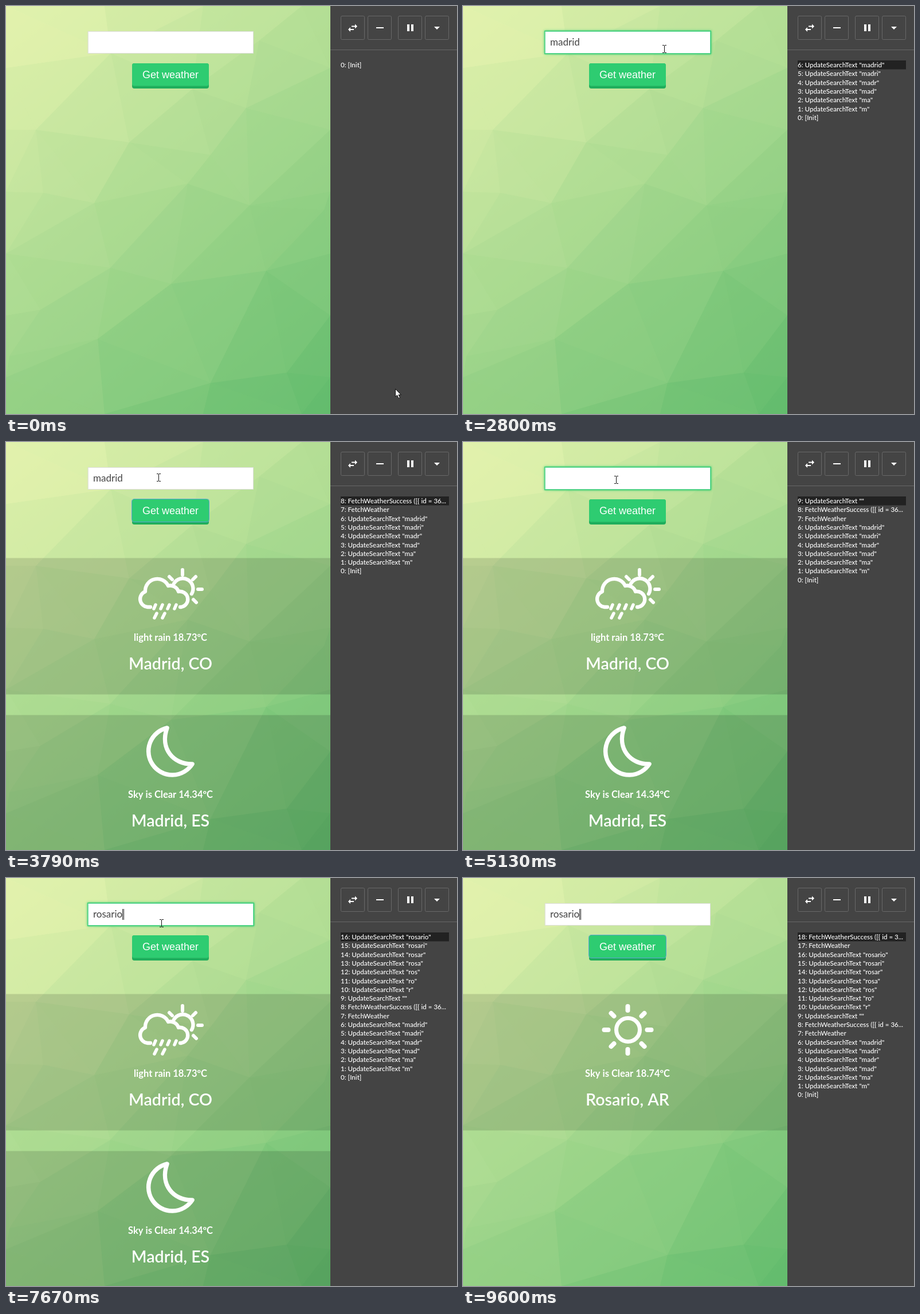
These frames come from a looping animation (787 px wide and 712 px high, 9980 ms). An HTML page with a canvas:

```html
<!DOCTYPE html>
<html lang="en">
<head>
<meta charset="utf-8">
<title>Weather search</title>
<style>
html, body { margin: 0; width: 100%; height: 100%; overflow: hidden; background: #444; }
canvas { display: block; }
</style>
</head>
<body>
<canvas id="stage" width="787" height="712"></canvas>
<script>
const LOOP = 9980, STEP = 77.4;
const WIDTH = 566, HEIGHT = 712, MID = 287;
const GREEN = '#2ecc71';
const FOCUS = 1090, SUBMIT = 3330, RESULT = 3790;
const REFOCUS = 4500, SELECT = 4660, CLEAR = 5130, SUBMIT_2 = 8140, RESULT_2 = 8530;

const ctx = document.getElementById('stage').getContext('2d');
const clamp = k => Math.min(1, Math.max(0, k));
const mix = (a, b, k) => a + (b - a) * k;

// Low-poly backdrop: Delaunay mesh, each face tinted by its place on the diagonal
function meshPoints() {
  const points = `183,82 442,60 325,145 419,178 52,216 215,238 357,260 317,310 425,348 555,356
    154,344 65,326 182,457 288,485 454,462 60,530 160,581 357,658 490,640 6,611`
    .split(/\s+/).map(p => p.split(',').map(Number));
  for (let y = 0; y < HEIGHT; y += 108) points.push([0, y], [WIDTH, y]);
  for (let x = 172; x < WIDTH; x += 172) points.push([x, 0], [x, HEIGHT]);
  points.push([0, HEIGHT], [WIDTH, HEIGHT]);
  return points;
}

function circumcentre([ax, ay], [bx, by], [cx, cy]) {
  const d = 2 * (ax * (by - cy) + bx * (cy - ay) + cx * (ay - by));
  if (!d) return null;
  const a = ax * ax + ay * ay, b = bx * bx + by * by, c = cx * cx + cy * cy;
  return [
    (a * (by - cy) + b * (cy - ay) + c * (ay - by)) / d,
    (a * (cx - bx) + b * (ax - cx) + c * (bx - ax)) / d
  ];
}

function triangulate(points) {
  const faces = [];
  const distance = (p, q) => Math.hypot(p[0] - q[0], p[1] - q[1]);
  points.forEach((a, i) => points.slice(i + 1).forEach((b, j) => {
    for (const c of points.slice(i + j + 2)) {
      const o = circumcentre(a, b, c);
      if (o && points.every(p => distance(o, p) > distance(o, a) - 1e-6)) faces.push([a, b, c]);
    }
  }));
  return faces;
}

function tint(k) {
  const channels = [mix(236, 103, k), mix(246, 190, k), mix(178, 111, k)];
  return `rgb(${channels.map(Math.round)})`;
}

function paintBackdrop() {
  const layer = document.createElement('canvas');
  layer.width = WIDTH;
  layer.height = HEIGHT;
  const g = layer.getContext('2d');
  const fade = g.createLinearGradient(0, 0, WIDTH, HEIGHT);
  fade.addColorStop(0, tint(0));
  fade.addColorStop(1, tint(1.05));
  g.fillStyle = fade;
  g.fillRect(0, 0, WIDTH, HEIGHT);
  g.globalAlpha = .75;
  for (const face of triangulate(meshPoints())) {
    const along = face.reduce((sum, [x, y]) => sum + x * WIDTH + y * HEIGHT, 0) / 3;
    g.fillStyle = tint(1.05 * along / (WIDTH ** 2 + HEIGHT ** 2));
    g.beginPath();
    face.forEach(p => g.lineTo(...p));
    g.fill();
  }
  return layer;
}
const backdrop = paintBackdrop();

const words = [
  { word: 'madrid', start: 1620, gap: 112 },
  { word: 'rosario', start: 5360, gap: 78 }
];
const typed = ({ word, start, gap }, t) => word.slice(0, Math.max(0, Math.floor((t - start) / gap) + 1));
const update = s => `UpdateSearchText "${s}"`;
const keyEvents = ({ word, start, gap }) =>
  [...word].map((_, i) => [start + i * gap, update(word.slice(0, i + 1))]);
const log = [
  [0, '[Init]'],
  ...keyEvents(words[0]),
  [SUBMIT, 'FetchWeather'],
  [RESULT, 'FetchWeatherSuccess ([{ id = 36...'],
  [CLEAR, update('')],
  ...keyEvents(words[1]),
  [SUBMIT_2, 'FetchWeather'],
  [RESULT_2, 'FetchWeatherSuccess ([{ id = 3...']
];

// Pointer moves: from time, to time, end point
const moves = [
  [0, 620, 353, 55], [840, 920, 353, 73], [2720, SUBMIT, 298, 120], [SUBMIT, 3640, 266, 62],
  [3940, 4020, 267, 66], [7440, SUBMIT_2, 285, 120], [SUBMIT_2, 8430, 299, 175],
  [8440, 8910, 288, 434], [9060, 9590, 695, 722]
];
function pointerAt(t) {
  return moves.reduce(([x, y], [from, to, endX, endY]) => {
    const k = clamp((t - from) / (to - from)), eased = k * k * (3 - 2 * k);
    return [mix(x, endX, eased), mix(y, endY, eased)];
  }, [679, 668]);
}

const ramp = (t, start) => clamp((t - start + 40) / 150);
const focusAt = t => ramp(t, FOCUS) - ramp(t, SUBMIT) + ramp(t, REFOCUS) - ramp(t, SUBMIT_2);

function text(s, x, y, font, color, align = 'left') {
  ctx.font = font;
  ctx.fillStyle = color;
  ctx.textAlign = align;
  ctx.fillText(s, x, y);
}
function box(x, y, w, h, color) {
  ctx.fillStyle = color;
  ctx.fillRect(x, y, w, h);
}
function rounded(x, y, w, h, r, fill, stroke) {
  ctx.beginPath();
  ctx.roundRect(x, y, w, h, r);
  if (fill) { ctx.fillStyle = fill; ctx.fill(); }
  if (stroke) { ctx.strokeStyle = stroke; ctx.lineWidth = 1; ctx.stroke(); }
}
function line(d, width, color = '#fff') {
  ctx.strokeStyle = color;
  ctx.lineWidth = width;
  ctx.stroke(new Path2D(d));
}

const icons = {
  rain() {
    line('M252 288H247A14 14 0 0 1 243 261A21 21 0 0 1 283 251A15 15 0 0 1 301 261A13.7 13.7 0 0 1 306 288H304', 6.3);
    line('M293 247A17 17 0 1 1 324 265', 6.3);
    line('M308 223V232M331 235L326 240M335 257H342M327 275L332 280M285 235L290 240', 6);
    for (let i = 0; i < 4; i++) line(`M${261 + 12 * i} 284l-3 7`, 5.5);
    line('M263 299l-4 8M277 299l-4 8', 5.5);
  },
  moon() {
    line('M281 225A41.5 41.5 0 1 0 325 288C293 289 268 262 281 225Z', 7.5);
  },
  sun() {
    line('M267.5 265a20.5 20.5 0 1 0 41 0a20.5 20.5 0 1 0-41 0', 7);
    for (let i = 0; i < 8; i++) {
      const c = Math.cos(i * Math.PI / 4), s = Math.sin(i * Math.PI / 4);
      line(`M${287.5 + 34 * c} ${265 + 34 * s}L${287.5 + 41 * c} ${265 + 41 * s}`, 8);
    }
  }
};

function card(offset, icon, sky, city) {
  ctx.save();
  ctx.translate(0, offset);
  box(0, 202.5, WIDTH, 238, 'rgba(0,0,0,.135)');
  icons[icon]();
  text(sky, MID, 347, '700 16.5px Lato, sans-serif', '#fff', 'center');
  text(city, MID, 397, '600 28.6px Lato, sans-serif', '#fff', 'center');
  ctx.restore();
}

function searchField(t, focus) {
  ctx.save();
  if (focus > 0) {
    ctx.globalAlpha = focus;
    ctx.shadowColor = GREEN;
    ctx.shadowBlur = 4;
    box(142, 43, 291, 41, GREEN);
  }
  ctx.restore();
  rounded(143.5, 44.5, 288, 38, 0, '#fff', focus > .5 ? '#7fdca6' : '#ddd');

  const selected = t >= SELECT && t < CLEAR;
  const value = typed(words[t < CLEAR ? 0 : 1], t);
  const font = '17px Lato, sans-serif';
  ctx.font = font;
  const end = Math.round(152 + ctx.measureText(value).width);
  if (selected) box(152, 54, end - 152, 20, '#3390ff');
  text(value, 152, 69, font, selected ? '#fff' : '#444');
  if (t >= words[1].start) {
    box(end, 54, 1, 19, '#222');
    box(end + 2, 54, 1, 19, '#222');
  }
}

function button(t) {
  const loading = t >= SUBMIT && t < RESULT || t >= SUBMIT_2 && t < RESULT_2;
  const focused = t >= SUBMIT && t < REFOCUS || t >= SUBMIT_2;
  const w = loading ? 114 : 134, x = MID - w / 2;
  rounded(x, 100, w, 44, 4, '#1fae5c');
  rounded(x, 100, w, 39.5, 4, GREEN);
  if (focused) rounded(x - .5, 99.5, w + 1, 40, 4, null, '#5aa5d0');
  text(loading ? 'Loading...' : 'Get weather', MID, 126,
    '18px "Liberation Sans", Arial, sans-serif', '#fff', 'center');
}

function debuggerPanel(t) {
  box(WIDTH, 0, 221, HEIGHT, '#444');
  box(WIDTH, 76, 221, 1, '#666');
  for (const x of [584.5, 631.5, 684.5, 731.5]) rounded(x, 17.5, 41, 41, 2, null, '#686868');
  ctx.fillStyle = '#fff';
  ctx.fill(new Path2D('M603 34.5h6v-3l4 4l-4 4v-3h-6zM607 40h-6v-3l-4 4l4 4v-3h6zM747 36h10l-5 5z'));
  box(646, 37, 13, 2, '#fff');
  box(700, 32, 4, 12, '#fff');
  box(707, 32, 4, 12, '#fff');

  const rows = log.filter(([time]) => t >= time).map(([, message], i) => `${i}: ${message}`).reverse();
  if (rows.length > 1) box(584, 95, 189, 15.5, '#222');
  rows.forEach((row, i) =>
    text(row, 584, Math.round(107 + i * 15.3), '500 11.6px Lato, sans-serif', '#fff'));
}

function pointer(x, y) {
  x = Math.round(x);
  y = Math.round(y);
  ctx.save();
  ctx.translate(x, y);
  if (x > 143 && x < 432 && y > 43 && y < 84) {
    ctx.lineCap = 'butt';
    line('M-3 -6.5H0M1 -6.5H4M.5 -6V6M-3 6.5H0M1 6.5H4', 1, '#111');
  } else {
    const arrow = 'M.5 .5V14L3.5 11L6 16.5L8.5 15.5L6 10.5H10Z';
    ctx.fillStyle = '#fff';
    ctx.fill(new Path2D(arrow));
    line(arrow, 1, '#111');
  }
  ctx.restore();
}

function draw(t) {
  const stepped = Math.floor((t + 10) / STEP) * STEP;
  ctx.lineCap = ctx.lineJoin = 'round';
  ctx.drawImage(backdrop, 0, 0);
  if (t >= RESULT_2) {
    card(0, 'sun', 'Sky is Clear 18.74ºC', 'Rosario, AR');
  } else if (t >= RESULT) {
    card(0, 'rain', 'light rain 18.73ºC', 'Madrid, CO');
    card(274, 'moon', 'Sky is Clear 14.34ºC', 'Madrid, ES');
  }
  searchField(t, focusAt(stepped));
  button(t);
  debuggerPanel(t);
  pointer(...pointerAt(stepped));
}

const start = performance.now();
function frame() {
  draw((performance.now() - start) % LOOP);
  requestAnimationFrame(frame);
}
frame();
</script>
</body>
</html>
```
